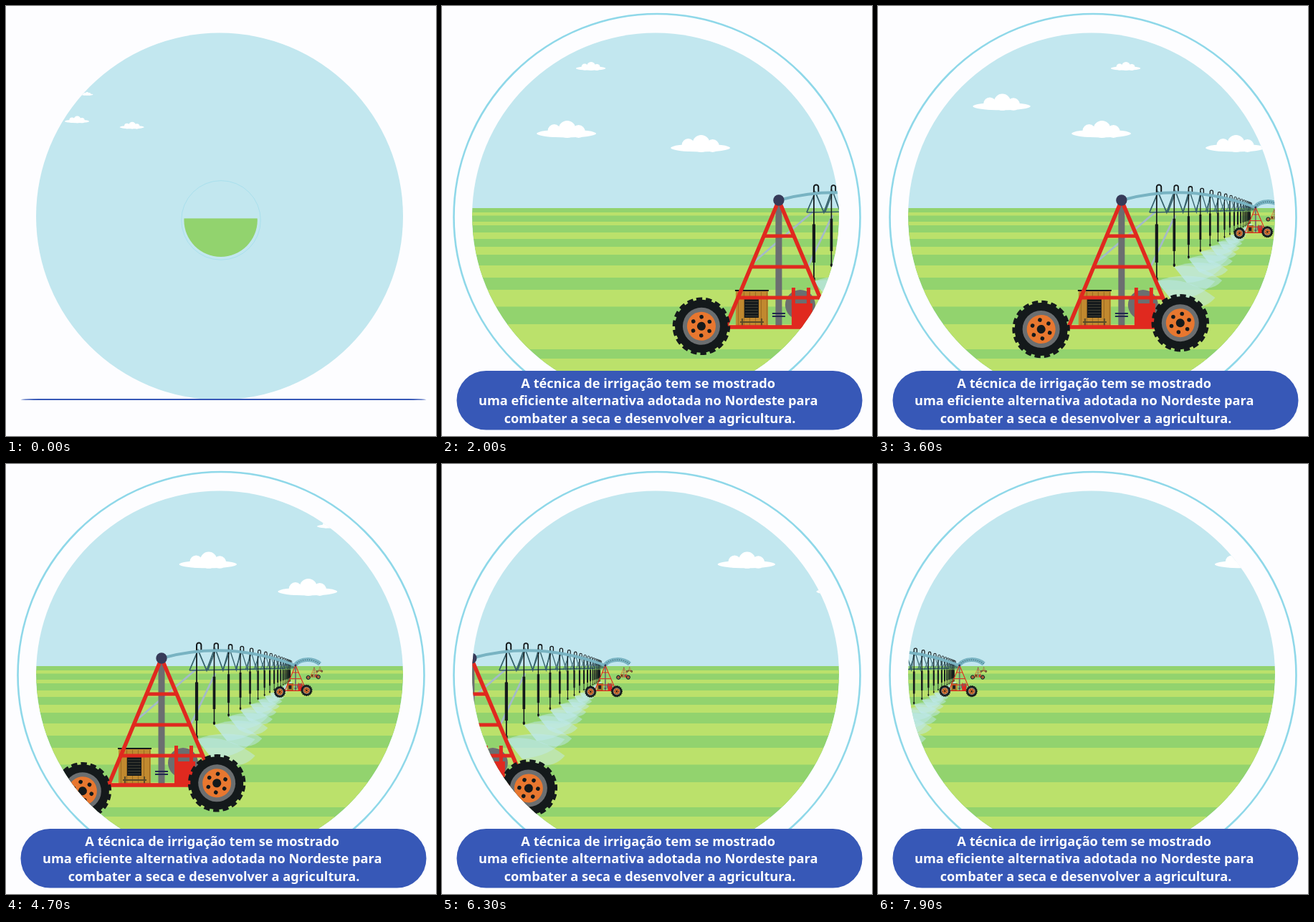
Animation of 600 by 600 pixels, one loop 8 s. Source, as an HTML page with a canvas:

```html
<!DOCTYPE html>
<html lang="pt">
<head>
<meta charset="utf-8">
<style>
html, body { margin: 0; width: 100%; height: 100%; overflow: hidden; background: #fdfdff; }
canvas { display: block; }
</style>
</head>
<body>
<canvas id="stage" width="600" height="600"></canvas>
<script>
const c = document.getElementById('stage').getContext('2d');
const LOOP = 8000, STEP = 100, TAU = Math.PI * 2;
const RED = '#e0291f', GREY = '#6b6e70', BLACK = '#14191b', TEAL = '#78b3c2', TRUSS = '#35606b';
const LINES = [
  'A técnica de irrigação tem se mostrado',
  'uma eficiente alternativa adotada no Nordeste para',
  'combater a seca e desenvolver a agricultura.'
];
// top and bottom of each light band of the field
const BANDS = [[288, 292.5], [301, 306], [316, 325], [336, 347], [362, 379], [396, 419.5], [444, 479], [492, 560]];
const CLOUDS = [[208, 87, .5], [174, 178, 1], [361, 198, 1], [35, 140, .97]];

const easeOut = (t, start, end, power) =>
  1 - (1 - Math.min(1, Math.max(0, (t - start) / (end - start)))) ** power;

function group(draw) { c.save(); draw(); c.restore(); }

function scaleAt(x, y, sx, sy = sx) {
  c.translate(x, y);
  c.scale(sx, sy);
  c.translate(-x, -y);
}

function disc(x, y, r, fill, ry = r) {
  c.beginPath();
  c.ellipse(x, y, r, ry, 0, 0, TAU);
  c.fillStyle = fill;
  c.fill();
}

function rect(x, y, w, h, fill) {
  c.fillStyle = fill;
  c.fillRect(x, y, w, h);
}

function line(color, width, ...p) {
  c.beginPath();
  c.moveTo(p[0], p[1]);
  for (let i = 2; i < p.length; i += 2) c.lineTo(p[i], p[i + 1]);
  c.strokeStyle = color;
  c.lineWidth = width;
  c.stroke();
}

function clipDisc(x) {
  c.beginPath();
  c.arc(x, 293.5, 256, 0, TAU);
  c.clip();
}

function cloud(x, y, s) {
  group(() => {
    c.translate(x, y);
    c.scale(s, s);
    disc(0, 0, 41.5, '#fff', 5.5);
    disc(1, -6, 12, '#fff');
    disc(-17, -4, 9, '#fff');
    disc(17, -3, 9, '#fff');
  });
}

function clouds(t) {
  const shift = 202 + 285 * Math.sin(.000351 * (t - 4250));
  group(() => {
    scaleAt(104, 149, 1 - .59 * (1 - easeOut(t, 0, 900, 3)));
    for (const [x, y, s] of CLOUDS) cloud(x + shift, y, s);
  });
}

function field(t) {
  group(() => {
    scaleAt(300, 300, 1 - .8 * (1 - easeOut(t, 0, 900, 3)));
    clipDisc(298);
    rect(0, 282, 600, 300, '#92d36e');
    clipDisc(298 - 520 * (1 - easeOut(t, 200, 1000, 2)));
    for (const [top, bottom] of BANDS) rect(0, top, 600, bottom - top, '#bbe16b');
  });
}

// the hub sits slightly off its pivot, so the wheel wobbles as it turns
function wheel(x, y, turn) {
  group(() => {
    c.translate(x, y);
    c.rotate(turn);
    c.translate(5.3, 0);
    disc(0, 0, 37, BLACK);
    c.beginPath();
    c.arc(0, 0, 37, 0, TAU);
    c.strokeStyle = BLACK;
    c.lineWidth = 6.5;
    c.setLineDash([TAU * 37 / 36 + 1.6, TAU * 37 / 36 - 1.6]);
    c.stroke();
    disc(0, 0, 26, GREY);
    disc(0, 0, 20, '#e8772f');
    disc(0, 0, 6, BLACK);
    for (let i = 0; i < 6; i++) {
      const a = i * TAU / 6 + .2;
      disc(13 * Math.cos(a), 13 * Math.sin(a), 2.8, BLACK);
    }
  });
}

function tower(x) {
  const turn = start => -Math.PI / 2 - (start - x) * .0092;
  rect(-60, 126, 45, 50, '#c1892f');
  for (let i = 0; i < 6; i++) rect(-57 + i * 8, 128, 1, 48, '#9a6a22');
  rect(-61, 125, 47, 2, BLACK);
  rect(-48, 138, 20, 26, BLACK);
  for (let y = 141; y < 163; y += 4) rect(-47, y, 18, .8, '#4c4a3c');
  rect(-54, 169, 33, 2, '#5a4a28');
  rect(-52, 165, 2, 10, '#5a4a28');
  rect(-25, 165, 2, 10, '#5a4a28');
  disc(30, 146, 21, GREY);
  rect(-4.5, 4, 9, 172, GREY);
  rect(-9, 157, 18, 2, '#22294f');
  rect(-9, 161, 18, 2, '#22294f');
  line(RED, 5.5, 0, 0, -74, 177, 68, 177);
  line(RED, 5.5, 0, 0, 75, 177);
  line(RED, 5, -21, 50, 21, 50);
  line(RED, 5, -39, 93, 39, 93);
  line(RED, 5, -57, 136, 57, 136);
  rect(18, 144, 29, 35, RED);
  rect(18, 122, 5, 24, RED);
  rect(39, 122, 5, 24, RED);
  disc(0, 0, 7.7, '#363a58');
  wheel(-107, 181, turn(490));
  wheel(82, 176.5, turn(341));
}

function towerAt(dx, dy, s, x) {
  group(() => {
    c.translate(dx, dy);
    c.scale(s, s);
    tower(x);
  });
}

const pipeY = x => -12 + 22 * ((x - 70) / 117) ** 2;

function spray(x, y, u) {
  c.fillStyle = 'rgba(192,234,238,.5)';
  for (const k of [.1, .27]) {
    c.beginPath();
    c.moveTo(x, y);
    c.quadraticCurveTo(x + .3 * u, y - .14 * u + k * .3 * u, x + .6 * u, y + (k - .1) * u);
    c.quadraticCurveTo(x + .45 * u, y + (k + .08) * u, x + .16 * u, y + .2 * u);
    c.closePath();
    c.fill();
  }
}

function boom(x) {
  // distant spans
  for (const [w, color] of [[6, TEAL], [1.2, TRUSS]]) {
    c.beginPath();
    c.moveTo(187, 9);
    c.bezierCurveTo(194, 0, 212, 0, 221, 8);
    c.strokeStyle = color;
    c.lineWidth = w;
    group(() => { if (w < 2) c.setLineDash([1, 2]); c.stroke(); });
  }
  towerAt(221, 12, .035, x);
  towerAt(213, 13, .075, x);

  // each drop is placed by its distance u to the far end
  const drops = [];
  for (let i = 0, u = 136; i < 17; i++, u *= .82) drops.push({ u, x: 185 - u, end: i ? 29.5 + .57 * u : 113 });
  for (const d of drops) spray(d.x, d.end, d.u);

  line('#a3bac9', 2.8, 50, 14, -38, 89);
  line('#a3bac9', 2.8, 75, 21, 40, 94);
  line(TRUSS, 1.5, 39, 17, 95, 16, 172, 14);
  drops.forEach((d, i) => {
    const k = .35 + d.u / 210, next = i < 16 ? drops[i + 1].x : 184;
    const y = pipeY(d.x), foot = 17 - 3 * i / 16;
    line(TRUSS, 1.8 * k, d.x - 10 * k, foot, d.x + 2, y, d.x + 14 * k, foot, next, pipeY(next));
    line(BLACK, 1.8 * k, d.x, y - 4 * k, d.x, d.end);
    const len = d.end - y;
    line(BLACK, 4.2 * k, d.x, y + len * .36, d.x, y + len * .79);
    line(BLACK, 3.5 * k, d.x, d.end - 5 * k, d.x, d.end - 1);
    c.beginPath();
    c.moveTo(d.x, y + 3);
    c.lineTo(d.x, y - 7 * k);
    c.arc(d.x + 3.2 * k, y - 7 * k, 3.2 * k, Math.PI, TAU);
    c.lineTo(d.x + 6.4 * k, y + 1);
    c.lineWidth = 2 * k;
    c.stroke();
  });
  c.beginPath();
  c.moveTo(4, -1);
  c.quadraticCurveTo(93.5, -25.1, 187, 10);
  c.strokeStyle = TEAL;
  c.lineWidth = 4;
  c.stroke();
  towerAt(187, 10, .2, x);
}

function machine(t) {
  const s = easeOut(t, 450, 1050, 2);
  if (!s) return;
  const x = 205.4 - 298 * Math.sin(.00039 * (t - 4800));
  group(() => {
    scaleAt(453, 299, s);
    c.translate(x, 271);
    boom(x);
    tower(x);
  });
}

function ring(t) {
  group(() => {
    scaleAt(300, 300, 1 - .805 * (1 - easeOut(t, 0, 900, 3)));
    c.beginPath();
    c.arc(300, 294.5, 283.5, 0, TAU);
    c.strokeStyle = '#8fd8e9';
    c.lineWidth = 2.6;
    c.stroke();
  });
}

function caption(t) {
  group(() => {
    scaleAt(0, 549, 1, .025 + .975 * easeOut(t, 0, 700, 3));
    c.beginPath();
    c.roundRect(20.5, 509, 566, 82.5, 41);
    c.fillStyle = '#3758b7';
    c.fill();
  });
  c.font = '700 18.2px "Noto Sans", "Open Sans", sans-serif';
  c.textAlign = 'left';
  c.fillStyle = '#fff';
  const head = 92 + (t - 800) * .13;
  let index = 0;
  LINES.forEach((text, row) => {
    const base = 533 + row * 24.3;
    const left = (row === 2 ? 290 : 287.7) - c.measureText(text).width / 2;
    if (head > 220) {
      c.fillText(text, left, base);
      return;
    }
    [...text].forEach((ch, i) => {
      const s = 1 - 2 ** (-.08 * (head - index++));
      if (s <= 0) return;
      const x = left + c.measureText(text.slice(0, i)).width;
      group(() => {
        scaleAt(x + c.measureText(ch).width / 2, base - 4, s);
        c.fillText(ch, x, base);
      });
    });
  });
}

function draw(now) {
  const t = Math.floor(now % LOOP / STEP) * STEP;
  rect(0, 0, 600, 600, '#fdfdff');
  disc(298, 293.5, 256, '#c2e7ef');
  group(() => {
    clipDisc(298);
    clouds(t);
    field(t);
    machine(t);
  });
  ring(t);
  caption(t);
  requestAnimationFrame(draw);
}
requestAnimationFrame(draw);
</script>
</body>
</html>
```
